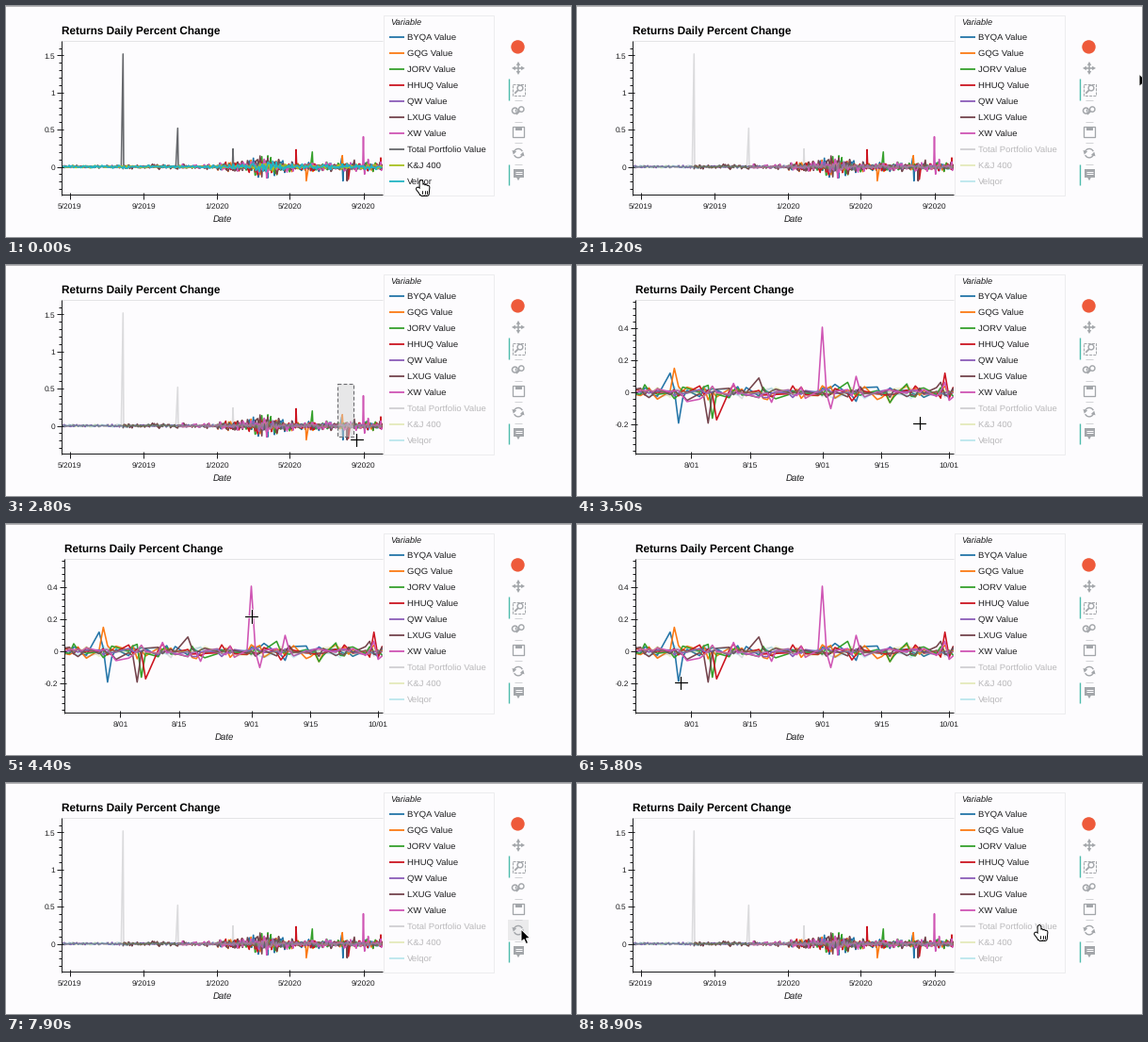
A matplotlib script for the animation above (9000 ms loop, 600 px wide and 245 px high).

```python
import numpy as np
import matplotlib.pyplot as plt
from matplotlib.animation import FuncAnimation
from matplotlib.patches import Circle, Polygon, Rectangle

W, H = 600, 245
FRAMES, STEP = 90, 100
TOP, BOTTOM, RIGHT = 37, 200, 400
PAPER, INK, ICON, TEAL = "#fdfcfe", "#1c1c1e", "#a3a6aa", "#4dbbac"

plt.rcParams.update({"font.family": "Liberation Sans", "text.hinting": "none"})
fig = plt.figure(figsize=(W / 100, H / 100), dpi=100, facecolor=PAPER)
ax = fig.add_axes([0, 0, 1, 1])
ax.set(xlim=(0, W), ylim=(H, 0))
ax.axis("off")


def pt(px):
    return px * 0.72


def text(x, y, s, size, **kw):
    kw.setdefault("color", INK)
    return ax.text(x, y, s, fontsize=pt(size), va="baseline", **kw)


def line(xs, ys, color=INK, width=1.0, **kw):
    kw.setdefault("solid_capstyle", "butt")
    return ax.plot(xs, ys, color=color, lw=pt(width), **kw)[0]


def hline(y, x0, x1, *args, **kw):
    return line([x0, x1], [y, y], *args, **kw)


def vline(x, y0, y1, *args, **kw):
    return line([x, x], [y0, y1], *args, **kw)


def rect(x, y, w, h, fill="none", edge="none", width=1.0, **kw):
    return ax.add_patch(Rectangle((x, y), w, h, facecolor=fill, edgecolor=edge,
                                  lw=pt(width), **kw))


# ---- daily returns; days count from the zero date ----
ZERO = np.datetime64("2020-09-01")
DAYS = np.arange(-502, 33)
DAYS = DAYS[np.is_busday(ZERO + DAYS)]
rng = np.random.default_rng(12)

# name, colour, first day, volatility, main shocks {day: value}
SERIES = [
    ("BYQA Value", "#2475a8", -243, 1, {-36: .12, -34: -.19}),
    ("GQG Value", "#fb7a14", -243, 1, {-95: -.19, -35: .15}),
    ("JORV Value", "#35a02c", -243, 1, {-85: .2, -26: -.16}),
    ("HHUQ Value", "#cc1420", -243, 1, {-112: .23, -25: -.17, 29: .12}),
    ("QW Value", "#8b5cb8", -502, .5, {}),
    ("LXUG Value", "#74444c", -400, 1, {-27: -.19, -15: .09}),
    ("XW Value", "#cf55b4", -309, 1, {0: .405, 2: -.1, 8: .1}),
    ("Total Portfolio Value", "#66686c", -502, .6, {-400: 1.52, -309: .52, -217: .24}),
    ("K&J 400", "#a8c020", -502, .5, {}),
    ("Velqor", "#22b4c4", -502, .6, {}),
]


def returns(first, vol, shocks):
    d = DAYS[DAYS >= first]
    sigma = np.where(d < -244, .012, .021) + .03 * np.exp(-((d + 165) / 25) ** 2)
    v = np.clip(rng.standard_t(5, d.size), -3, 3) * sigma * vol
    for day, value in shocks.items():
        v[np.abs(d - day).argmin()] = value
    return d, v


class View:
    """One zoom level: title, axes and series lines."""

    def __init__(self, left, origin, scale, dates, date_text, values, minor):
        self.origin, self.scale = np.array(origin), np.array(scale)
        self.clip = Rectangle((left, TOP), RIGHT - left, BOTTOM - TOP,
                              transform=ax.transData)
        self.lines = []
        self.parts = [
            text(left - .3, 30.8, "Returns Daily Percent Change", 11.8,
                 weight="bold", color="black"),
            hline(TOP, left, RIGHT, "#e4e4e6"),
            vline(left - .5, TOP, BOTTOM + .5, zorder=4),
            hline(BOTTOM, left - .5, RIGHT, zorder=4),
        ]
        add = self.parts.append
        for date in dates:
            x, _ = self.place((date - ZERO).astype(int), 0)
            add(vline(x, BOTTOM - 2, BOTTOM + 5, zorder=4))
            add(text(x, 214.5, date_text(date.item()), 8.4, ha="center"))
        for value in values:
            _, y = self.place(0, value)
            add(hline(y, left - 5.5, left + 1.5, zorder=4))
            add(text(left - 7, y + 3, f"{value:g}", 8.4, ha="right"))
        for n in range(-9, 18):
            _, y = self.place(0, n * minor)
            if TOP < y < BOTTOM:
                add(hline(y, left - 3.5, left - .5, zorder=4))

    def place(self, day, value):
        return (self.origin[0] + self.scale[0] * day,
                self.origin[1] - self.scale[1] * value)

    def plot(self, d, v, color):
        ln = line(*self.place(d, v), color, 1.6, zorder=3, solid_joinstyle="round")
        ln.set_clip_path(self.clip)
        self.lines.append(ln)

    def show(self, on, alphas):
        for p in self.parts + self.lines:
            p.set_visible(on)
        for ln, a in zip(self.lines, alphas):
            ln.set_alpha(a)


months = np.arange("2019-05", "2020-10", 4, dtype="M8[M]").astype("M8[D]")
halves = [np.datetime64(f"2020-{m:02}-{d:02}")
          for m in (8, 9, 10) for d in (1, 15)][:5]
full = View(59, (379.5, 170.5), (.638, 78.7), months,
            lambda d: f"{d.month}/{d.year}", np.arange(4) * .5, .1)
zoom = View(62, (260.5, 135.2), (4.49, 171), halves,
            lambda d: f"{d.month}/{d.day:02}", np.arange(-1, 3) * .2, .04)

for name, color, *model in SERIES:
    d, v = returns(*model)
    for view in (full, zoom):
        view.plot(d, v, color)

date_label = text(230, 229, "Date", 9.6, style="italic", ha="center")
rect(0, 0, W, 1.3, "#b6b5b8")

# ---- legend ----
rect(400.5, 10.5, 117, 190.5, PAPER, "#ececee", zorder=5)
text(408, 20.4, "Variable", 9.2, style="italic", zorder=6)
rows = []
for i, (name, color, *_) in enumerate(SERIES):
    y = 33 + 16.95 * i
    rows.append((hline(y, 407, 422.5, color, 1.8, zorder=6),
                 text(425.5, y + 3.4, name, 9.45, zorder=6)))

# ---- toolbar ----
BAR_X = 544
slots = 43.4 + 22.55 * np.arange(7)
logo, pan, box, wheel, save, reset, hover = slots

ax.add_patch(Circle((543.5, logo), 7.2, color="#ee5a3a", lw=0))
hover_box = rect(533, reset - 11, 21.5, 22, "#ebebec")
for y in (box, hover):
    vline(533.5, y - 11, y + 11, TEAL, 1.4)
for y in slots[2:6]:
    hline(y + 11.5, 540, 548, "#d2d3d6")


def arc(x, y, r, start=0, stop=360, width=1.4):
    a = np.radians(np.linspace(start, stop, 30))
    line(x + r * np.cos(a), y + r * np.sin(a), ICON, width)


def head(x, y, angle, size):
    a = np.radians(angle + np.array([0, 120, 240]))
    ax.add_patch(Polygon(np.c_[x + size * np.cos(a), y + size * np.sin(a)],
                         color=ICON, lw=0))


def lens(x, y, r):
    arc(x, y, r)
    line([x - .7 * r, x - 2 * r], [y + .7 * r, y + 2 * r], ICON, 1.8)


hline(pan, BAR_X - 5, BAR_X + 5, ICON, 1.6)
vline(BAR_X, pan - 5, pan + 5, ICON, 1.6)
for angle in range(0, 360, 90):
    c, s = np.cos(np.radians(angle)), np.sin(np.radians(angle))
    head(BAR_X + 4.4 * c, pan + 4.4 * s, angle, 2.6)

rect(BAR_X - 6, box - 6, 12.5, 12, edge=ICON, linestyle=(0, (3, 1.2)))
lens(BAR_X + 2, box - 1.5, 2.9)

ax.add_patch(Circle((BAR_X - 3.5, wheel), 3, fc="none", ec=ICON, lw=pt(1.5)))
vline(BAR_X - 3.5, wheel - 2, wheel + 1, ICON, 1.2)
lens(BAR_X + 3.3, wheel - 1.5, 2.7)

rect(BAR_X - 6, save - 6, 12, 11.5, edge=ICON, width=1.3)
rect(BAR_X - 3, save - 5.5, 6.5, 3.6, ICON)

for start in (15, 195):
    end = np.radians(start)
    arc(BAR_X, reset, 4.7, start, start + 140)
    head(BAR_X + 4.7 * np.cos(end), reset + 4.7 * np.sin(end), start - 90, 2.8)

rect(BAR_X - 5.5, hover - 5.5, 11, 8.5, ICON)
head(BAR_X, hover + 3.5, 90, 3)
for y in (hover - 3, hover - .5):
    hline(y, BAR_X - 3.5, BAR_X + 3.5, PAPER)

# ---- selection box and cursors ----
select = rect(0, 0, 1, 1, (.827, .827, .827, .5), "#6c6c70", 1.1,
              linestyle=(0, (3.5, 2)), zorder=7)


def strokes(*segments):
    gap = (np.nan, np.nan)
    return np.array([p for a, b in segments for p in (a, b, gap)])


def pen(color, width, z):
    return line([], [], color, width, zorder=z, solid_capstyle="round")


ARROW = np.array([(0, 0), (0, 13.5), (3.1, 10.8), (5.2, 15.6), (7.6, 14.6),
                  (5.5, 9.9), (9.6, 9.6)])
CROSS = strokes(((-6.5, 0), (6.5, 0)), ((0, -6.5), (0, 6.5)))
FINGERS = strokes(((0, 1.5), (0, 14)), ((-3.6, 9), (1, 14.5)),
                  *[((k, 5 + .3 * k), (k * .9, 14.5)) for k in (2.4, 4.8, 7)])
KNUCKLES = strokes(*[((k, 10.5), (k, 13.5)) for k in (1.2, 3.5, 5.8)])

arrow = ax.add_patch(Polygon(ARROW, fc="black", ec="white", lw=.72, zorder=9))
hand = [(pen("black", 4.8, 8), FINGERS), (pen("white", 2.8, 9), FINGERS),
        (pen("black", .9, 10), KNUCKLES)]
cross = [(pen("white", 2.6, 8), CROSS), (pen("black", 1.2, 9), CROSS)]

# pointer stops: ms, x, y
PATH = np.array([
    (0, 441, 185), (900, 484, 151), (1200, 597, 72), (2400, 352, 126),
    (2800, 372, 185), (3100, 408, 198), (4200, 260, 98), (4900, 264, 98),
    (5800, 110, 168), (6200, 110, 168), (7000, 565, 165), (7300, 547, 155),
    (7900, 547, 155), (8800, 491, 151), (9000, 491, 151)])
PRESS, RELEASE, RESET = 2400, 3200, 7600
FIRST_MUTED, CLICK_GAP = 7, 300


def pointer(t):
    i = np.searchsorted(PATH[:, 0], t, side="right") - 1
    (t0, *a), (t1, *b) = PATH[i], PATH[i + 1]
    u = (t - t0) / (t1 - t0)
    return np.array(a) + np.subtract(b, a) * u * u * (3 - 2 * u)


def draw_cursor(x, y, dragging):
    in_plot = dragging or (x < RIGHT and TOP < y < BOTTOM)
    in_legend = not in_plot and RIGHT <= x < 517
    arrow.set_visible(not in_plot and not in_legend)
    arrow.set_xy(ARROW + (x, y))
    for layers, on in ((hand, in_legend), (cross, in_plot)):
        for ln, shape in layers:
            ln.set_visible(on)
            ln.set_data(*(shape + (x, y)).T)


def update(n):
    t = n * STEP
    x, y = pointer(t)
    dragging = PRESS < t < RELEASE
    zoomed = RELEASE <= t < RESET

    # legend clicks mute the last rows one by one, bottom up
    muted = [i >= FIRST_MUTED and t >= CLICK_GAP * (len(SERIES) - i)
             for i in range(len(SERIES))]
    alphas = [.22 if m else 1 for m in muted]
    full.show(not zoomed, alphas)
    zoom.show(zoomed, alphas)
    date_label.set_x(231.5 if zoomed else 230)
    for row, m in zip(rows, muted):
        for part in row:
            part.set_alpha(.3 if m else 1)

    select.set_visible(dragging)
    if dragging:
        _, x0, y0 = PATH[PATH[:, 0] == PRESS][0]
        select.set_bounds(x0, y0, min(x - 3, RIGHT) - x0, min(y - 3, BOTTOM) - y0)
    hover_box.set_visible(533 < x < 555 and abs(y - reset) < 11)
    draw_cursor(x, y, dragging)
    return []


anim = FuncAnimation(fig, update, frames=FRAMES, interval=STEP, repeat=True,
                     repeat_delay=0, blit=False)
plt.show()
```
